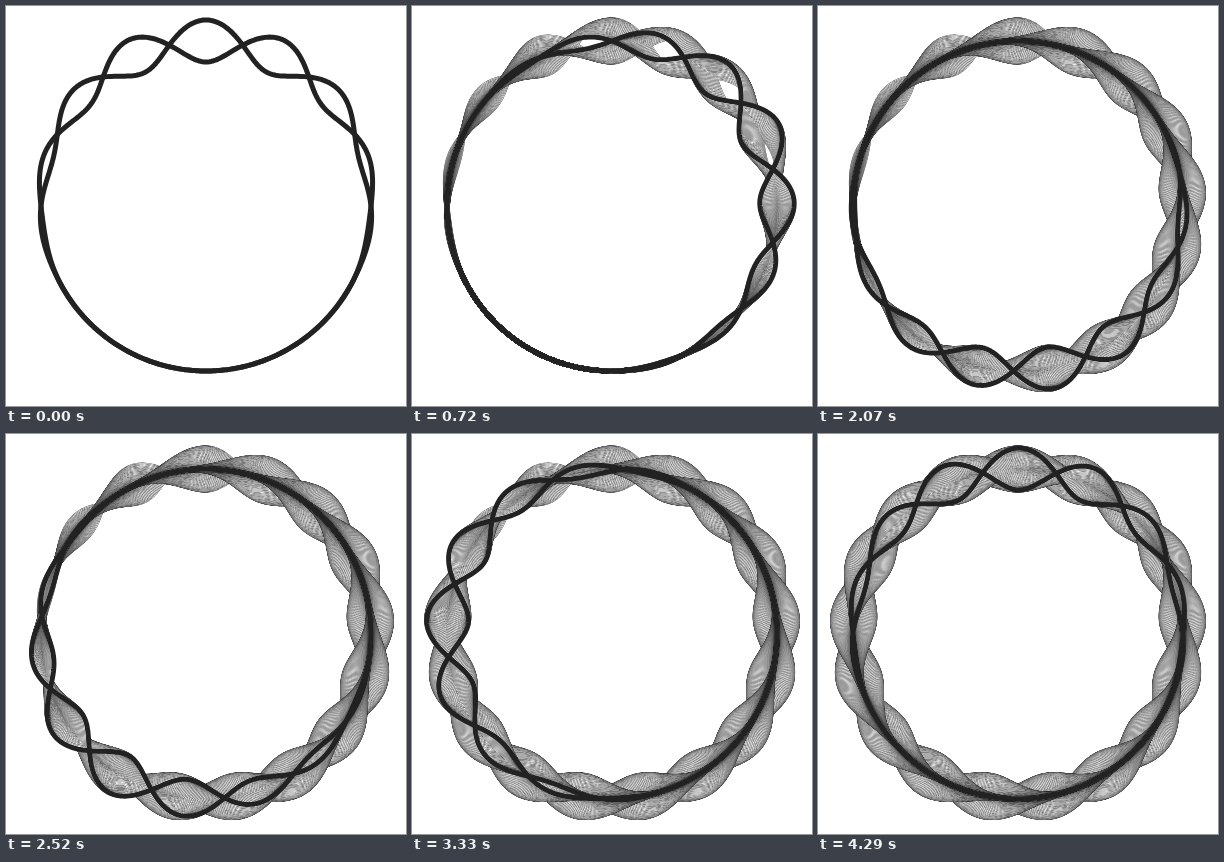
Recreate the animation shown at these times as an HTML page with a canvas. Size 400 px wide and 400 px high, loop 4320 ms.

```html
<!DOCTYPE html>
<html lang="en">
<head>
<meta charset="utf-8">
<title>Wave packet on a ring</title>
<style>
  html, body { margin: 0; width: 100%; height: 100%; overflow: hidden; background: #fff; }
  canvas { display: block; width: 400px; height: 400px; }
</style>
</head>
<body>
<canvas id="stage" width="400" height="400"></canvas>
<script>
const ctx = document.getElementById('stage').getContext('2d');
const TAU = Math.PI * 2;
const STEP = 30, STEPS = 144;
const CENTER = 200, RADIUS = 165, SWING = 21, WAVES = 7;
const INK = '#222', PAPER = '#fff';
const LINE = 5, ERASER = 4.3;
const POINTS = 540;

// The envelope runs clockwise once per loop while the carrier drifts back by 1.5 waves.
function strand(u, sign) {
  const path = new Path2D();
  for (let i = 0; i < POINTS; i++) {
    const a = i / POINTS * TAU;
    const envelope = Math.cos((a - u * TAU) / 2) ** 6;
    const wave = Math.cos(WAVES * a + 3 * Math.PI * u);
    const r = RADIUS + sign * SWING * envelope * wave;
    path.lineTo(CENTER + r * Math.sin(a), CENTER - r * Math.cos(a));
  }
  path.closePath();
  return path;
}

function strokeAll(paths, color, width) {
  ctx.strokeStyle = color;
  ctx.lineWidth = width;
  for (const path of paths) ctx.stroke(path);
}

let shown = -1, last = [];

// Each step wipes only the core of the previous lines, so their rims stay as a trail.
function advance() {
  shown++;
  strokeAll(last, PAPER, ERASER);
  last = [1, -1].map(sign => strand(shown / STEPS, sign));
  strokeAll(last, INK, LINE);
}

function reset() {
  ctx.fillStyle = PAPER;
  ctx.fillRect(0, 0, 400, 400);
  shown = -1;
  last = [];
}

function render() {
  const step = Math.floor(performance.now() / STEP) % STEPS;
  if (step < shown) reset();
  while (shown < step) advance();
  requestAnimationFrame(render);
}

ctx.lineJoin = 'round';
reset();
render();
</script>
</body>
</html>
```
